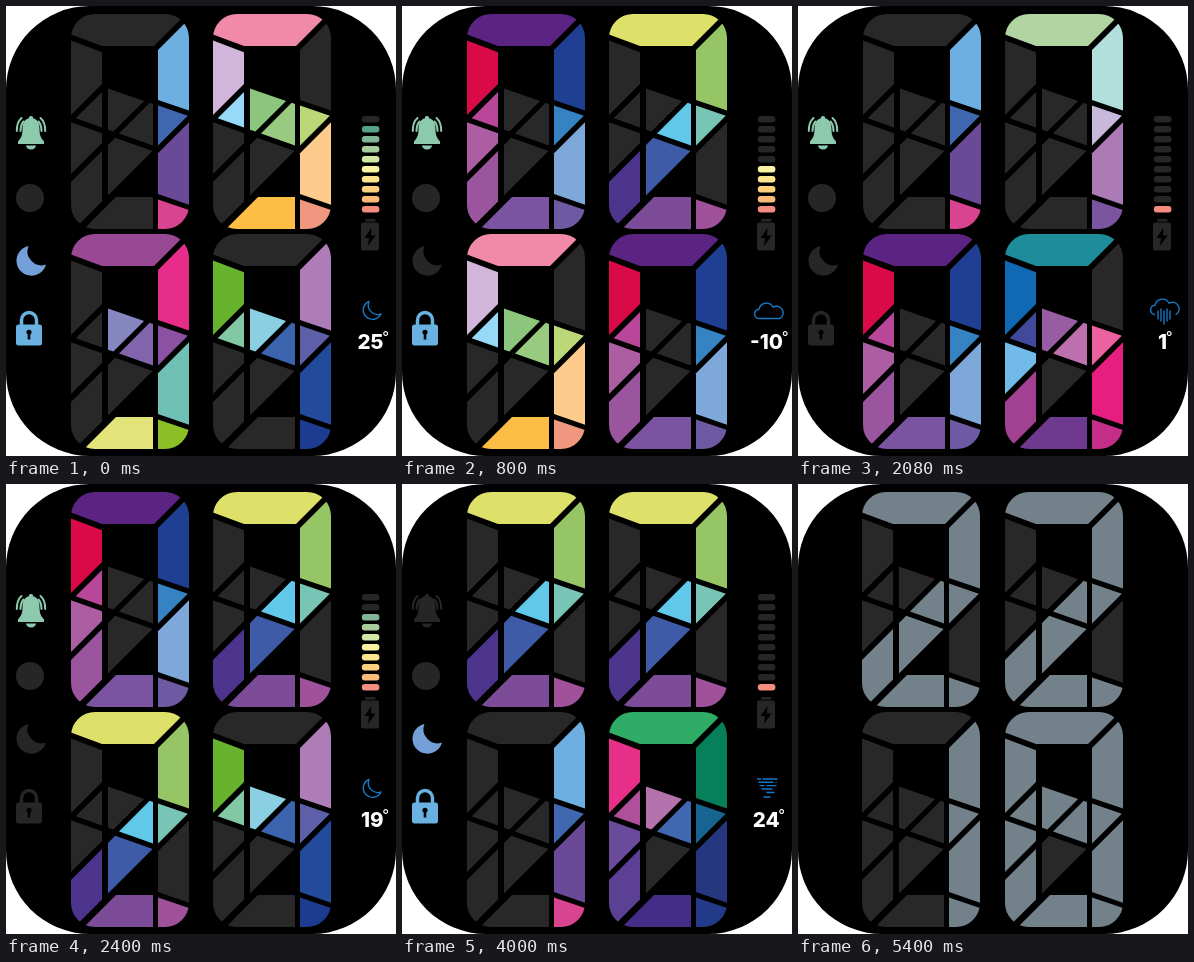
Write an HTML page that moves like this. It is 390 px wide and 450 px high and loops after 5800 ms.

```html
<!DOCTYPE html>
<html lang="en">
<head>
<meta charset="utf-8">
<title>Segment clock</title>
<style>
html, body { margin: 0; width: 100%; height: 100%; overflow: hidden; background: #fff; }
svg { display: block; position: absolute; left: 0; top: 0; }
text { font-family: Inter, "Open Sans", sans-serif; fill: #fff; }
.temp { font-size: 20.5px; font-weight: 800; text-anchor: end; }
.deg { font-size: 15px; }
.sky { fill: none; stroke: #1777c2; stroke-width: 1.4; stroke-linecap: round; stroke-linejoin: round; }
</style>
</head>
<body>
<svg id="stage" width="390" height="450" viewBox="0 0 390 450">
  <defs><clipPath id="round"><rect width="118" height="215" rx="24"/></clipPath></defs>
  <rect width="390" height="450" rx="84"/>
  <g id="digits"></g>
  <g id="status">
    <g id="bell">
      <path d="M25 110a2 2 0 0 1 2 2.3C32 113.5 33.500 118 33.500 123C33.500 131 36 133 38 135.500V138H12V135.500C14 133 16.500 131 16.500 123C16.500 118 18 113.500 23 112.300a2 2 0 0 1 2-2.300z"/>
      <path d="M20 139.500h10a5 4 0 0 1-10 0z"/>
      <path fill="none" stroke-width="2" stroke-linecap="round" d="M15.500 112C12 115 10.800 119 10.800 125M17.500 115.500C15.300 118 14.500 121 14.500 125M34.500 112C38 115 39.200 119 39.200 125M32.500 115.500C34.700 118 35.500 121 35.500 125"/>
    </g>
    <circle cx="24" cy="192" r="14" fill="#262626"/>
    <path id="moon" d="M22.500 240A15 15 0 1 0 40 258.500A14 14 0 0 1 22.500 240z"/>
    <g id="lock">
      <rect x="10" y="318.500" width="26" height="21" rx="2.500"/>
      <path fill="none" stroke-width="3.500" d="M15.500 320v-6a7.500 7.500 0 0 1 15 0v6"/>
      <path fill="#000" d="M21.700 328.500a2.600 2.600 0 1 1 2.600 0v5h-2.600z"/>
    </g>
    <g id="bars"></g>
    <g fill="#262626">
      <rect x="359" y="213" width="10.500" height="2.500" rx="1"/>
      <rect x="355" y="216.500" width="18" height="28" rx="2"/>
      <path fill="#000" d="M365.500 222l-7 10h4.500l-1 8 7.500-10.500h-4.500z"/>
    </g>
    <path id="sky" class="sky"/>
    <text id="temp" class="temp" y="342.5"></text>
    <text id="deg" class="deg" y="335.800">°</text>
  </g>
</svg>
<script>
const DARK = '#282828', OFF = '#262626', GREY = '#73828a';
const $ = id => document.getElementById(id);

function add(parent, tag, attrs) {
  const el = document.createElementNS('http://www.w3.org/2000/svg', tag);
  for (const k in attrs) el.setAttribute(k, attrs[k]);
  return parent.appendChild(el);
}

// Cells of one digit inside a 118 x 215 box
const CELLS = {
  a: '0,0 115,0 83,32 31,32 0,20.5',
  b: '0,26.5 31,38.3 31,70 0,101',
  c: '118,5 118,96.4 87,85.9 87,36',
  d: '31,78 31,113.5 4.7,104.3',
  e: '37,74.6 73.1,86.9 42.4,117.6 37,115.7',
  f: '78.7,88.8 82,89.9 82,131.4 48,119.5',
  g: '87,91.6 116.8,101.7 87,131.5',
  h: '0,108.3 31,119.2 31,129 0,160',
  i: '31,137 31,187.5 3.5,215 0,215 0,168',
  j: '37,131 44.2,123.8 81.6,136.9 37,181.5',
  k: '118,108.3 118,190.8 87,180 87,139.3',
  l: '87,185.5 118,196 118,215 87,215',
  m: '45,183 82,183 82,215 13,215'
};

// Lit cells of each numeral with their colours
const NUMERALS = [
  'a5b2482 bda0a49 c1e3f92 db8479a g3683c3 had5ea2 i9b559e k7fa8da l6d5aa2 m7a54a0',
  'c6cafe0 g4068b0 k6a4a98 ld8448f',
  'adde16a c96c566 f62c8ea g78c5b6 i4d348c j3d5ba7 l9f529a m7c4c98',
  'a994894 ce62d89 e8686c0 f8264ac g8a52a0 k70c1b5 l8cbf26 me2e47a',
  'b68b32e cae7cb6 d82c8a5 e8ad0e2 f3c64ae g5e5fa9 k234b9b l1d3c8f',
  'af08aa8 bd1b5da d97d9f8 e8cc67c f98cb80 gbcd778 kfdcb8c lf0987f mfdbe45',
  'a1e8d9b b1069b4 d414a9a e985ca2 fbd6fae gec619f h72bbe8 ia24092 ke61e80 lc42d88 m6d3a90',
  'ab1d5a2 cb2dedb gc8b8dc kac7ab4 l7c55a0',
  'a2fac66 be8308a c06805a db0509a eb573ae f3f68b0 g176490 h6a4a9a i5c4094 k25377f l233a88 m432d86'
].map(s => Object.fromEntries(s.split(' ').map(c => [c[0], '#' + c.slice(1)])));

const BAR_COLOURS = [DARK, '#58a08c', '#82b598', '#a9cc9f', '#d2e6a6',
  '#f9f4a2', '#fde58f', '#fdd07e', '#fbb97a', '#f48c80'];

const CLOUD = 'a4.700 4.700 0 0 1 .500-9.300a7.500 7.500 0 0 1 14-2a5.700 5.700 0 0 1 7 11.300';
const hline = (x, y, w) => `M${x} ${y}h${w}`;
const dots = (x, y, n, gap) => Array.from({ length: n }, (_, i) => hline(x + i * gap, y, 0.1)).join('');
const SKIES = {
  moon: 'M363 295.500A9.300 9.300 0 1 0 375 308A9.500 9.500 0 0 1 363 295.500z',
  cloud: 'M356.500 312.500' + CLOUD + 'z',
  rain: 'M356.500 308.500' + CLOUD + 'M360 305v8M363 303v12M366 305v13M369 303v12M372 305v8',
  wind: dots(355, 296.5, 6, 4) + dots(355, 300, 5, 4) +
    'M354.500 304h20a2 2 0 1 0-2-2M354.500 307h21M354.500 310h13a1.800 1.800 0 1 1-1.800 2' + dots(371, 311, 2, 4),
  tornado: hline(355.5, 295, 3) + hline(361, 295, 14) + hline(357, 298.3, 14) + hline(374, 298.3, 0.1) +
    hline(358, 301.6, 4) + hline(365, 301.6, 9) + hline(360, 305, 10) + hline(365, 308.5, 7) + hline(362, 313, 6)
};

const STEPS = [
  { at: 0,    time: '1534', bell: 1, moon: 1, lock: 1, level: 9, sky: 'moon',    temp: '25',  end: 377.5 },
  { at: 800,  time: '0250', bell: 1, moon: 0, lock: 1, level: 5, sky: 'cloud',   temp: '-10', end: 381 },
  { at: 1600, time: '1706', bell: 1, moon: 0, lock: 0, level: 1, sky: 'rain',    temp: '1',   end: 369 },
  { at: 2400, time: '0224', bell: 1, moon: 0, lock: 0, level: 8, sky: 'moon',    temp: '19',  end: 377.5 },
  { at: 3200, time: '0417', bell: 0, moon: 1, lock: 1, level: 1, sky: 'wind',    temp: '24',  end: 377.5 },
  { at: 4000, time: '2218', bell: 0, moon: 1, lock: 1, level: 1, sky: 'tornado', temp: '24',  end: 377.5 },
  { at: 4800, time: '2218', dim: true }
];
const LOOP = 5800;

const digits = [0, 1, 2, 3].map(n => {
  const box = add($('digits'), 'g', { 'clip-path': 'url(#round)' });
  const cells = {};
  for (const k in CELLS) cells[k] = add(box, 'polygon', { points: CELLS[k] });
  return { box, cells, x: n % 2 ? 207 : 65, y: n < 2 ? 8 : 228 };
});
const bars = BAR_COLOURS.map((_, i) =>
  add($('bars'), 'rect', { x: 355.8, y: 110 + i * 10, width: 17.6, height: 6.6, rx: 3 }));

function tint(id, on, colour) {
  const c = on ? colour : OFF;
  $(id).setAttribute('fill', c);
  $(id).querySelectorAll('[stroke-width]').forEach(p => p.setAttribute('stroke', c));
}

function show(s) {
  digits.forEach((d, n) => {
    const lit = NUMERALS[s.time[n]];
    const x = d.x - (s.dim && n % 2 === 0 ? 1 : 0);
    d.box.setAttribute('transform', `translate(${x} ${d.y})`);
    for (const k in d.cells)
      d.cells[k].setAttribute('fill', lit[k] ? (s.dim ? GREY : lit[k]) : DARK);
  });
  $('status').style.display = s.dim ? 'none' : '';
  if (s.dim) return;
  tint('bell', s.bell, '#8cc9ad');
  tint('moon', s.moon, '#749fd8');
  tint('lock', s.lock, '#68b1e0');
  bars.forEach((b, i) => b.setAttribute('fill', i >= 10 - s.level ? BAR_COLOURS[i] : OFF));
  $('sky').setAttribute('d', SKIES[s.sky]);
  $('temp').textContent = s.temp;
  $('temp').setAttribute('x', s.end);
  $('deg').setAttribute('x', s.end - 1.3);
}

const start = performance.now();
let current = null;
function tick() {
  const t = (performance.now() - start) % LOOP;
  const step = STEPS.filter(s => s.at <= t).pop();
  if (step !== current) show(current = step);
  requestAnimationFrame(tick);
}
tick();
</script>
</body>
</html>
```
